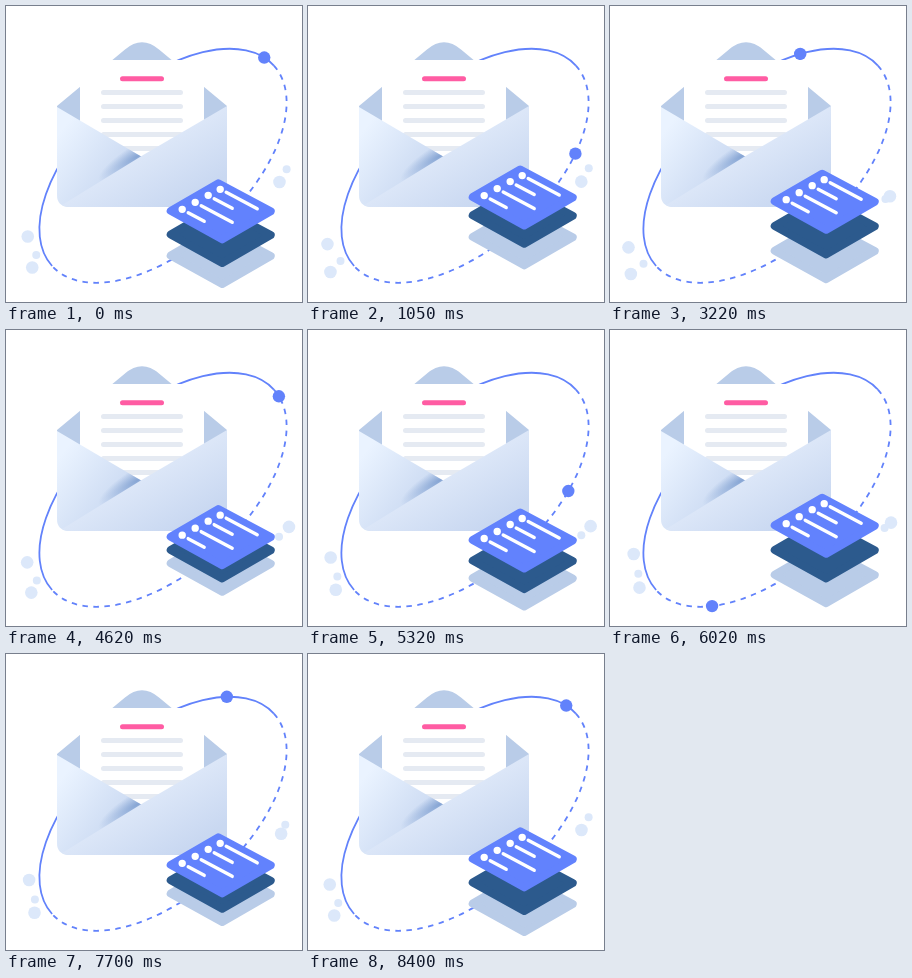
Write an HTML page that moves like this. It is 296 px wide and 296 px high and loops after 8.47 s.

```html
<!DOCTYPE html>
<html lang="en">
<head>
<meta charset="utf-8">
<title>Mail orbit</title>
<style>
  html, body { margin: 0; width: 100%; height: 100%; overflow: hidden; background: #fff; }
  svg { display: block; width: 100vw; height: 100vh; }
</style>
</head>
<body>
<svg viewBox="0 0 296 296">
  <defs>
    <linearGradient id="side" gradientUnits="userSpaceOnUse" x1="55" y1="125" x2="115" y2="170">
      <stop offset="0" stop-color="#eaf3ff"/>
      <stop offset="1" stop-color="#cbdaf2"/>
    </linearGradient>
    <radialGradient id="shade" gradientUnits="userSpaceOnUse" cx="0" cy="0" r="1"
      gradientTransform="translate(132 150) rotate(-32) scale(46 12)">
      <stop offset="0" stop-color="#86a5d4"/>
      <stop offset="1" stop-color="#86a5d4" stop-opacity="0"/>
    </radialGradient>
    <linearGradient id="front" gradientUnits="userSpaceOnUse" x1="125" y1="145" x2="160" y2="205">
      <stop offset="0" stop-color="#dfe9f9"/>
      <stop offset="1" stop-color="#c9d8f1"/>
    </linearGradient>
    <path id="tile" stroke-width="8" stroke-linejoin="round" d="M-49.5 -.5 L-2 -28 L50.5 0 L2 28 Z"/>
    <path id="panel" d="M51 101 L136 151 L70 201 H62 Q51 200 51 189 Z"/>
  </defs>

  <g id="left" fill="#dce8fa"></g>

  <g fill="none" stroke="#6282fb" stroke-width="1.8">
    <path d="M267.9 59.6 A149.4 81.4 -42.1 0 1 46.1 260" stroke-dasharray="5.5 5.5"/>
    <path d="M46.1 260 A149.4 81.4 -42.1 0 1 267.9 59.6"/>
    <path id="orbit" stroke="none"
      d="M267.9 59.6 A149.4 81.4 -42.1 0 1 46.1 260 A149.4 81.4 -42.1 0 1 267.9 59.6"/>
  </g>
  <circle id="planet" r="6.2" fill="#6282fb"/>

  <!-- envelope -->
  <path fill="#b9cce8" d="M51 100 L119 43.500 Q136 29 153 43.500 L221 100 V150 H51 Z"/>
  <path fill="#fff" d="M74 54 H198 V160 H74 Z"/>
  <g stroke-width="5" stroke-linecap="round">
    <path stroke="#ff5ca3" d="M116.500 72.700 H155.500"/>
    <path stroke="#e5eaf2" d="M97.500 86.500 h77 m-77 14 h77 m-77 14 h77 m-77 14 h77 m-77 14 h77"/>
  </g>
  <use href="#panel" fill="url(#side)"/>
  <use href="#panel" fill="url(#shade)"/>
  <path fill="url(#front)" d="M221 100 L138 148.500 L56 199 Q58.500 201 63 201 H221 Z"/>

  <!-- stacked tiles -->
  <use class="layer" href="#tile" fill="#b9cce8" stroke="#b9cce8"/>
  <use class="layer" href="#tile" fill="#2c5a8d" stroke="#2c5a8d"/>
  <g class="layer">
    <use href="#tile" fill="#6282fd" stroke="#6282fd"/>
    <path stroke="#fff" stroke-width="3.400" stroke-linecap="round"
      d="M-32 1.500 l16 8.500 M-19 -5.500 l31 16.500 M-6 -12.500 l18 9.500 M6 -19 l31 16.500"/>
    <path stroke="#fff" stroke-width="7.400" stroke-linecap="round"
      d="M-38 -2 h.01 M-25 -9 h.01 M-12 -16 h.01 M0 -22 h.01"/>
  </g>

  <g id="right" fill="#dce8fa"></g>
</svg>
<script>
const LOOP = 8470, STEP = 70, CYCLE = 8400, TAU = Math.PI * 2;
const get = id => document.getElementById(id);
const wave = turns => Math.cos(TAU * turns);
const orbit = get('orbit'), planet = get('planet');
const layers = [...document.querySelectorAll('.layer')];
const length = orbit.getTotalLength();

// each bubble swings about its home (x, y) by (dx, dy); a side shares one phase
const bubbles = [];
function addBubble(side, phase, r, x, y, dx, dy) {
  const el = document.createElementNS('http://www.w3.org/2000/svg', 'circle');
  el.setAttribute('r', r);
  get(side).append(el);
  bubbles.push({ el, phase, x, y, dx, dy });
}
addBubble('left', .79, 6.3, 21, 233, 3, -10);
addBubble('left', .79, 4, 31, 251, -3, -8);
addBubble('left', .79, 6.3, 25, 263, 5, -6);
addBubble('right', .07, 6.3, 278, 186, -5, -11);
addBubble('right', .07, 4, 277, 184, 4, -23);

// share of the orbit covered: slow at the top right, fast at the bottom left
function travel(t) {
  const p = t / 4200 % 1;
  return (p + 1.006 - .128 * Math.sin(TAU * p + .225) + .0055 * wave(2 * p)) % 1;
}

function place(el, x, y) {
  el.setAttribute('transform', `translate(${x.toFixed(2)} ${y.toFixed(2)})`);
}

function draw(t) {
  const dot = orbit.getPointAtLength(travel(t) * length);
  place(planet, dot.x, dot.y);
  // tiles bob in turn, the top one first
  layers.forEach((el, i) =>
    place(el, 214.2, 239.4 - 19 * i - 10.7 * wave(t / 2800 - .49 + .09 * i)));
  for (const b of bubbles) {
    const swing = wave(t / CYCLE - b.phase);
    place(b.el, b.x + b.dx * swing, b.y + b.dy * swing);
  }
}

const start = performance.now();
function tick() {
  const t = (performance.now() - start) % LOOP;
  draw(Math.floor(t / STEP) * STEP % CYCLE);
  requestAnimationFrame(tick);
}
tick();
</script>
</body>
</html>
```
